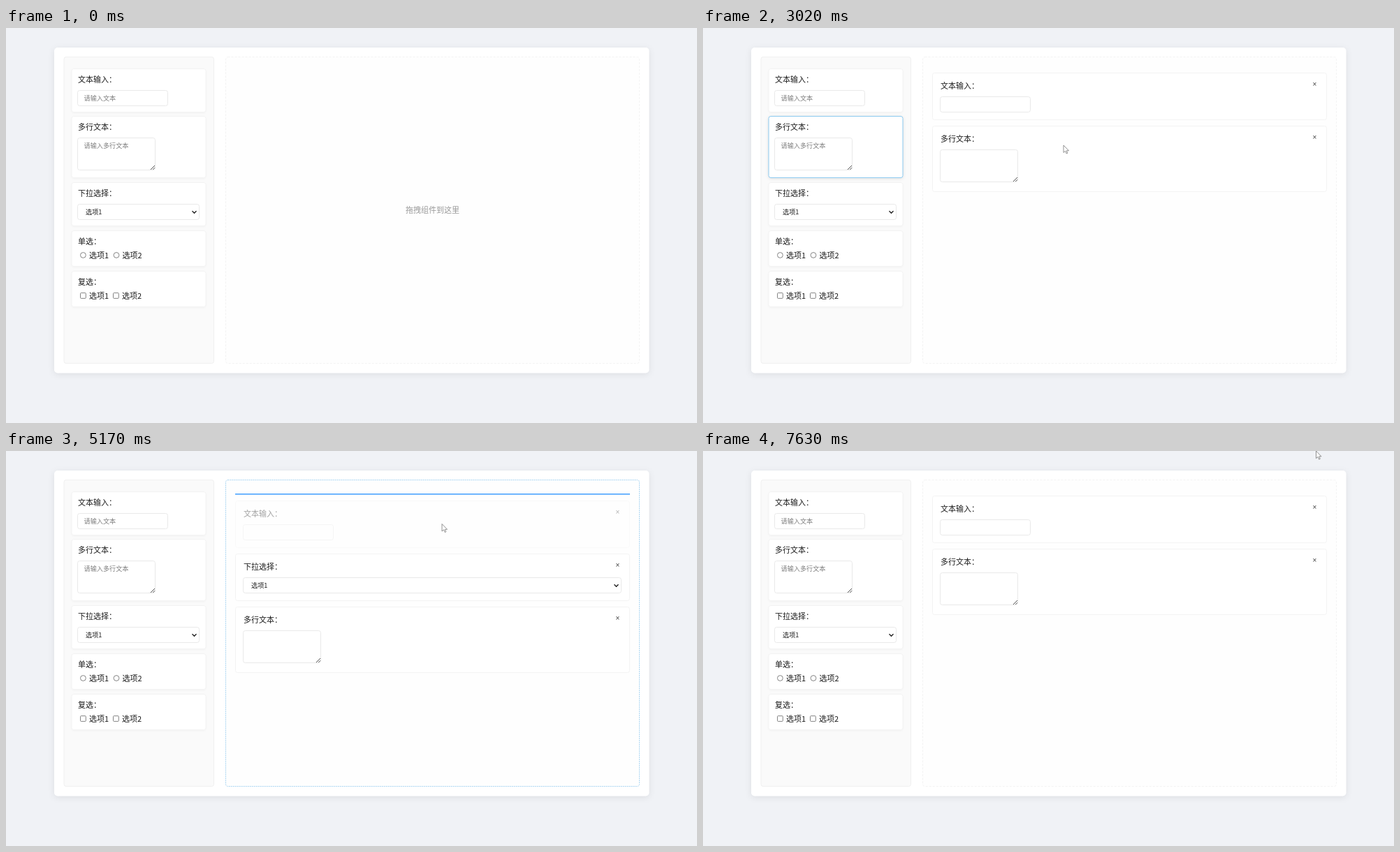
Animation, 989 px wide and 566 px high, one loop 7.73 s. Source, as an HTML page:

```html
<!DOCTYPE html>
<html lang="zh-CN">
<head>
<meta charset="utf-8">
<title>拖拽表单</title>
<style>
  html, body { margin: 0; width: 100%; height: 100%; overflow: hidden; background: #f0f2f6; }
  svg { display: block; width: 989px; height: 566px; }
  text { font: 500 11px "Noto Sans CJK SC", "Noto Sans CJK", sans-serif; fill: #1c1c1c; }
  .small { font-size: 9.15px; }
  .hint { font-weight: 400; fill: #7c7c7c; }
  .empty { font-weight: 400; fill: #999; text-anchor: middle; }
  .close { font: 10px "Liberation Sans", sans-serif; fill: #444; text-anchor: middle; }
  .page { fill: #fff; filter: drop-shadow(0 2px 5px rgba(0, 0, 0, .08)); }
  .side { fill: #fafafa; stroke: #f0f0f0; }
  .box { fill: #fff; stroke: #f3f3f3; }
  .field { fill: #fff; stroke: #e9e9e9; }
  .line { fill: none; stroke: #222; }
  .tick { fill: #fff; stroke: #777; stroke-width: .9; }
  .glow { fill: #fde5e5; }
  .canvas { fill: #fefefe; stroke: #f3f3f3; stroke-dasharray: 3 2; }
  .canvas.lit { stroke: #a9d5f2; stroke-dasharray: 2 1; }
  .drop { fill: #409eff; }
  .card .box { filter: drop-shadow(0 1px 1px rgba(0, 0, 0, .03)); }
  .card.hover .box { stroke: #8ccaf0; filter: drop-shadow(0 1px 2px rgba(0, 0, 0, .1)); }
  .item.hover .box { filter: drop-shadow(0 1px 3px rgba(0, 0, 0, .1)); }
  .pointer { fill: #fff; stroke: #777; stroke-width: .8; stroke-linejoin: round; }
</style>
</head>
<body>
<svg id="stage" viewBox="0 0 989 566"></svg>
<script>
const LOOP = 7730, ENTER = 110, LEAVE = 7630;
const stage = document.getElementById('stage');

const rect = (cls, x, y, w, h, r = 3) =>
  `<rect class="${cls}" x="${x}" y="${y}" width="${w}" height="${h}" rx="${r}"/>`;
// Text is placed by the vertical middle of its glyphs.
const text = (str, x, mid, cls = '') =>
  `<text class="${cls}" x="${x}" y="${mid + (cls.includes('small') ? 3.5 : 4.2)}">${str}</text>`;
const stroke = (d, w) => `<path class="line" stroke-width="${w}" d="${d}"/>`;

// Controls are drawn from their own top left corner.
const input = (w, hint) =>
  rect('field', 0, 0, 129, 22) + text(hint, 9, 11, 'small hint');
const textarea = (w, hint) =>
  rect('field', 0, 0, 111, 46) + text(hint, 9, 11, 'small hint') +
  stroke('M104.5 45.5l6-6m-2.8 6l2.8-2.8', .8);
const select = w =>
  rect('field', 0, 0, w, 22) + text('选项1', 11.5, 11, 'small') +
  stroke(`M${w - 10} 9.8l3 3 3-3`, 1.4);
const options = (round, step) => () => [0, 1].map(i =>
  rect('tick', 4 + i * step, 0, 7.8, 7.8, round) +
  text('选项' + (i + 1), 16.4 + i * step, 4)).join('');

const kinds = {
  input: { label: '文本输入：', hint: '请输入文本', h: 62.5, control: input },
  area: { label: '多行文本：', hint: '请输入多行文本', h: 89, control: textarea },
  select: { label: '下拉选择：', h: 62.5, control: select },
  radio: { label: '单选：', h: 52, control: options(4, 47.6) },
  check: { label: '复选：', h: 52, control: options(1, 47) }
};
const itemHeight = id => kinds[id].h + 5.7;
const shapes = {
  arrow: 'M0 0V10.5L2.6 8.3 4.2 12 5.8 11.3 4.3 7.8H7.5Z',
  move: 'M0-7.5L3-4H1.2V-1.2H4V-3L7.5 0 4 3V1.2H1.2V4H3L0 7.5-3 4H-1.2V1.2H-4V3L-7.5 0-4-3V-1.2H-1.2V-4H-3Z',
  hand: 'M-.5 7V.5a1.2 1.2 0 0 1 2.4 0V5l4.2 1.2q1.3.5 1 2L6 13H.5L-2.8 8.6q-.4-1.8 1-1.2z'
};

function panel(cls, id, x, w, h, pad, top, withHint) {
  const { label, hint, control } = kinds[id];
  const y = h < 60 ? 31.6 : top;
  return `<g class="${cls}" id="${cls}-${id}">${rect('box', x, .5, w, Math.round(h) - 1)}` +
    text(label, x + pad, top - 15.5) +
    `<g transform="translate(${x + pad - .5} ${y})">${control(w - 2 * pad, withHint && hint || '')}</g>` +
    (cls === 'item' ? '<circle class="glow" cx="875.5" cy="16.8" r="8"/>' + text('×', 875.5, 15.8, 'close') : '') +
    '</g>';
}
const ids = Object.keys(kinds);
const movable = ids.slice(0, 3);

stage.innerHTML =
  rect('page', 69, 28, 851.5, 466.5, 5) +
  rect('side', 83, 41.5, 214.5, 439) +
  rect('canvas', 314.5, 41.5, 592, 439) +
  ids.map(id => panel('card', id, 94, 192, kinds[id].h, 9, 31.5, true)).join('') +
  text('拖拽组件到这里', 610.5, 261, 'empty') +
  movable.map(id => panel('item', id, 328.5, 564, itemHeight(id), 11.5, 34.5)).join('') +
  rect('drop', 328, 0, 565, 1.5, 0) +
  '<path class="pointer"/>';

const $ = q => stage.querySelector(q);
const canvas = $('.canvas'), empty = $('.empty'), drop = $('.drop'), pointer = $('.pointer');
const show = (node, on) => { node.style.display = on ? '' : 'none'; };
const moveTo = (node, x, y) => node.setAttribute('transform', `translate(${x} ${y})`);

// The session: arrive at a point, grab an item and drop it in a slot of the form.
// The pointer rests during a drag and reappears at the drop point.
// Without a slot the item is removed; lit is when the canvas border goes plain.
const acts = [
  { item: 'input', from: [259, 84], at: 990, grab: 1600, drop: 2000, to: [540, 150], slot: 0, lit: 2000 },
  { item: 'area', from: [256, 150], at: 2340, grab: 2440, drop: 3020, to: [516, 168], slot: 1, lit: 3020 },
  { item: 'select', from: [256, 234], at: 3710, grab: 3850, drop: 4500, to: [612, 142], slot: 1, lit: 4000 },
  { item: 'input', from: [624, 104.5], at: 5040, grab: 5100, drop: 5650, to: [620, 190], slot: 2, lit: 6940 },
  { item: 'select', from: [878, 82.5], at: 6510, drop: 6940, to: [878, 82.5] },
  { from: [877.5, 0], at: LEAVE, drop: LOOP }
];

function apply(order, { item, slot }) {
  const own = order.indexOf(item);
  const next = order.filter(id => id !== item);
  if (slot !== undefined) next.splice(slot - (own >= 0 && own < slot), 0, item);
  return next;
}

const dragAt = t => acts.find(a => t >= a.grab && t < a.drop);

function pointAt(t) {
  let start = [480, 260], since = ENTER;
  for (const a of acts) {
    if (t < a.drop) {
      const p = Math.min(1, Math.max(0, (t - since) / (a.at - since)));
      const ease = p * p * (3 - 2 * p);
      return start.map((v, i) => v + (a.from[i] - v) * ease);
    }
    start = a.to;
    since = a.drop + 20;
  }
}

function draw(t) {
  const past = t - 40; // hover follows the pointer with a short delay
  const [x, y] = pointAt(t), [hx, hy] = pointAt(past);
  const drag = dragAt(t), held = dragAt(past);
  const order = acts.filter(a => a.drop <= t).reduce(apply, []);
  const inside = (left, w, top, h) =>
    t >= ENTER && hx > left && hx < left + w && hy > top && hy < top + h;
  let shape = 'arrow';

  let top = 58;
  for (const id of ids) {
    const node = $('#card-' + id), h = kinds[id].h;
    const on = inside(94, 192, top, h);
    if (on && !held) shape = 'move';
    node.classList.toggle('hover', on);
    moveTo(node, 0, Math.floor(top));
    top += h + 6;
  }

  // A dragged form item first marks its own place.
  let slot = -1;
  if (drag && order.length && t > drag.grab + 50) {
    const own = order.indexOf(drag.item);
    slot = own >= 0 && t < drag.grab + 160 ? own : drag.slot;
  }
  canvas.classList.toggle('lit', acts.some(a => t >= a.grab + 20 && t < a.lit));
  show(empty, !order.length);
  show(drop, slot >= 0);

  const gap = 8.2;
  top = 63.8;
  const mark = i => {
    if (i !== slot) return;
    if (!i) top -= 2.8;
    drop.setAttribute('y', Math.floor(top));
    top += 1.4 + gap;
  };
  for (const id of movable) show($('#item-' + id), order.includes(id));
  order.forEach((id, i) => {
    mark(i);
    const node = $('#item-' + id), h = itemHeight(id);
    const on = !held && inside(328, 565, top, h);
    const close = on && Math.hypot(hx - 875.5, hy - top - 16.8) < 8;
    if (on) shape = close ? 'hand' : 'move';
    node.classList.toggle('hover', on);
    show(node.querySelector('.glow'), close);
    moveTo(node, 0, Math.round(top));
    node.setAttribute('opacity', drag && drag.item === id ? .4 : 1);
    top += h + gap;
  });
  mark(order.length);

  show(pointer, t >= ENTER);
  moveTo(pointer, x, y);
  pointer.setAttribute('d', shapes[shape]);
}

const start = performance.now();
function tick() {
  draw((performance.now() - start) % LOOP);
  requestAnimationFrame(tick);
}
tick();
</script>
</body>
</html>
```
